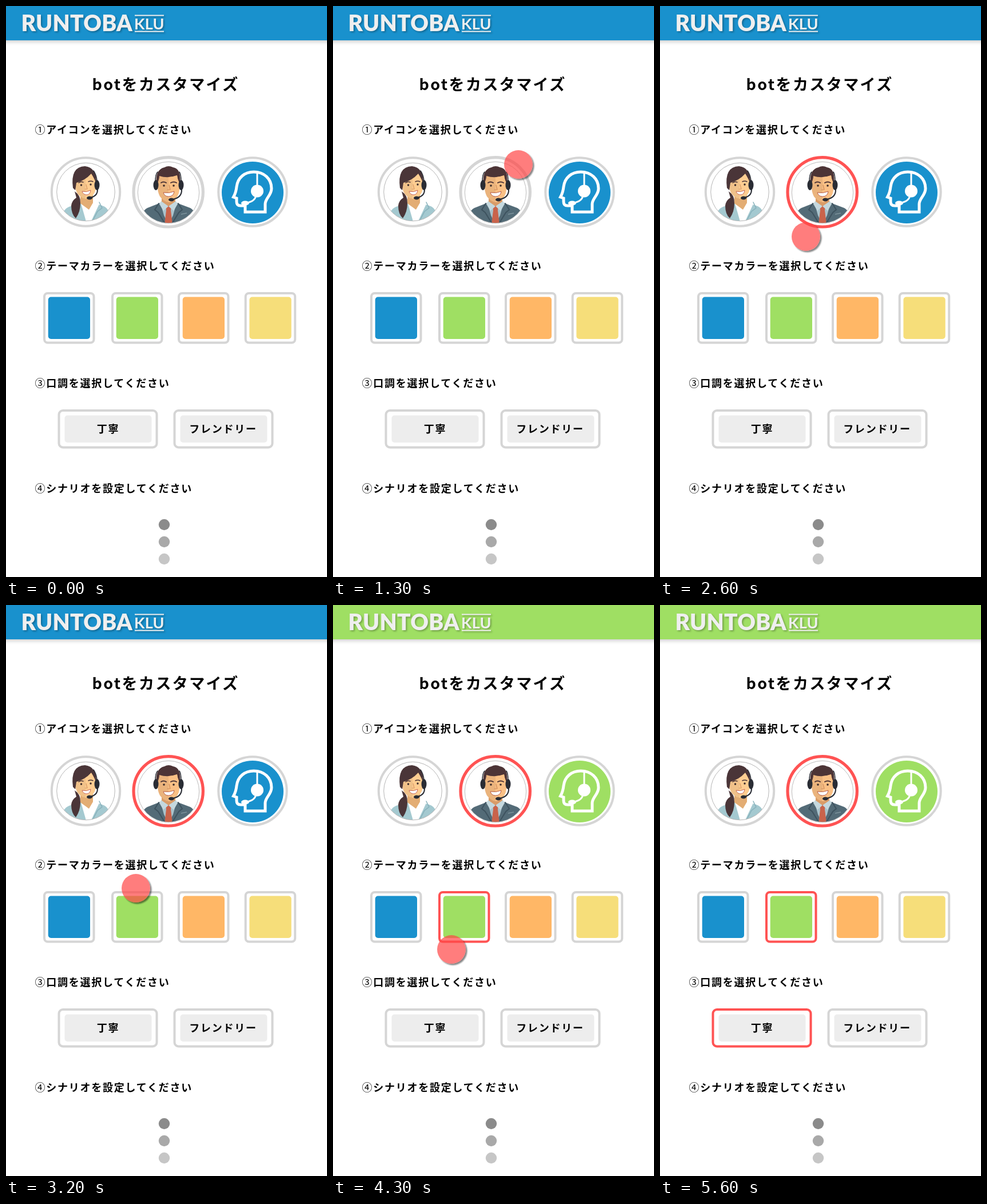
These frames come from a looping animation (561x998 px, 7600 ms). An HTML page:

```html
<!DOCTYPE html>
<html lang="ja">
<head>
<meta charset="utf-8">
<title>botをカスタマイズ</title>
<style>
  html, body { margin: 0; width: 100%; height: 100%; overflow: hidden; background: #fff; }
  svg { display: block; width: 100vw; height: 100vh; --theme: #1991cd; }
  text { font: 700 18px "Noto Sans CJK JP", "Noto Sans CJK", sans-serif; letter-spacing: 1.75px; fill: #000; }
  .thin { font-weight: 400; }
  .title { font-size: 27px; letter-spacing: 2.4px; }
  .brand text { font-family: Lato, sans-serif; font-weight: 900; fill: #efefef; letter-spacing: .2px; }
  .brand { filter: drop-shadow(2px 2px 1.5px rgba(0, 0, 0, .28)); }
  .bar { fill: var(--theme); filter: drop-shadow(0 3px 3px rgba(0, 0, 0, .18)); }
  .theme { fill: var(--theme); }
  .frame { fill: #fff; stroke: #d5d5d5; stroke-width: 4; }
  .frame.on { stroke: #ff5353; }
  .line { fill: none; stroke-linecap: round; stroke-linejoin: round; }
</style>
</head>
<body>
<svg id="stage" viewBox="0 0 561 998" preserveAspectRatio="none">
  <defs>
    <clipPath id="clipWoman"><circle cx="139.5" cy="325" r="50.5"/></clipPath>
    <clipPath id="clipMan"><circle cx="284" cy="326" r="53.5"/></clipPath>
    <clipPath id="rightHalfW"><rect x="139" y="280" width="40" height="80"/></clipPath>
    <clipPath id="rightHalfM"><rect x="284" y="280" width="40" height="80"/></clipPath>
    <filter id="soft" x="-30%" y="-30%" width="160%" height="160%"><feGaussianBlur stdDeviation="1.3"/></filter>
    <mask id="outside" maskUnits="userSpaceOnUse" x="-40" y="-40" width="80" height="80">
      <rect x="-40" y="-40" width="80" height="80" fill="#fff"/><circle r="25" fill="#000"/>
    </mask>
  </defs>

  <rect width="561" height="998" fill="#fff"/>
  <rect class="bar" x="-10" y="-10" width="581" height="70"/>
  <g class="brand">
    <text x="26.5" y="44" style="font-size:39px">RUNTOBA</text>
    <text x="224" y="40.5" style="font-size:27px;font-weight:700">KLU</text>
    <path d="M225 16.5H276M225 44.5H276" stroke="#efefef" stroke-width="2"/>
  </g>

  <text class="title" x="150.5" y="147">botをカスタマイズ</text>
  <g id="headings"></g>

  <!-- woman -->
  <circle class="frame" cx="139.5" cy="325" r="59.7"/>
  <g clip-path="url(#clipWoman)">
    <path d="M96 380Q97 356 110 351L131 344H153L171 350Q182 355 185 380Z" fill="#a4c9d0"/>
    <path d="M131 345L141 380H147L163 346L153 341Z" fill="#fff"/>
    <path d="M163 343L168 353L160 359L149 380" class="line" stroke="#86b0ba" stroke-width="1.5"/>
    <path d="M130 326H152V344L145 356L130 345Z" fill="#e3ad74"/>
    <path d="M120 324Q131 331 130 345Q130 360 122 371Q114 364 114 349Q115 340 123 335Z" fill="#4a3538"/>
    <path id="faceW" d="M120 306Q126 290 139 289Q152 290 157 304Q159 324 151 331Q144 337 139 337Q130 335 125 328Q120 320 120 306Z" fill="#f0c189"/>
    <use href="#faceW" clip-path="url(#rightHalfW)" style="filter:brightness(1.06)"/>
    <path d="M117 318Q112 281 138 280Q159 282 158 312Q156 304 149 293Q138 305 123 309Q122 316 121 322Z" fill="#4a3538"/>
    <path d="M127 309Q131 306 135 308M144 307Q148 305 152 307" class="line" stroke="#4a3538" stroke-width="1.5"/>
    <circle cx="131.5" cy="313" r="1.7" fill="#3b2b2b"/><circle cx="148" cy="312" r="1.7" fill="#3b2b2b"/>
    <path d="M140 312L142 320H138" class="line" stroke="#d99c68" stroke-width="1.2"/>
    <path d="M133 324Q141 326 148 322Q147 330 141 330Q135 330 133 324Z" fill="#fff" stroke="#c96657" stroke-width="1"/>
    <path d="M153 288Q158 295 159 306" class="line" stroke="#292c34" stroke-width="1.5"/>
    <ellipse cx="159" cy="313" rx="4.5" ry="9" fill="#292c34"/>
    <path d="M160 321Q160 332 148 335" class="line" stroke="#292c34" stroke-width="2"/>
    <ellipse cx="146" cy="335.5" rx="5" ry="3" fill="#292c34"/>
  </g>
  <circle cx="139.5" cy="325" r="50.8" fill="none" stroke="#b5b5b5"/>

  <!-- man -->
  <circle class="frame" id="pickMan" cx="283.7" cy="325.3" r="60.7" style="stroke-width:5.2px"/>
  <g clip-path="url(#clipMan)">
    <path d="M230 384Q237 357 247 353L270 344H298L322 353Q332 358 338 384Z" fill="#536b77"/>
    <path d="M270 344H298L292 366L284 382L276 366Z" fill="#a9c3cc"/>
    <path d="M272 330H296V344L284 351L272 344Z" fill="#d99c68"/>
    <path d="M279 349H289L288 357L291 382H277L280 357Z" fill="#c9634b"/>
    <path d="M271 341L284 350L275 358L268 346ZM297 341L284 350L293 358L300 346Z" fill="#c4d8de"/>
    <path d="M267 345L260 356L266 361L279 382M301 345L308 356L302 361L289 382" class="line" stroke="#3d525e" stroke-width="2"/>
    <path d="M306 364L316 362" stroke="#7d939c" stroke-width="1.5"/>
    <path d="M263 312Q260 286 277 282Q284 278 292 282Q307 284 304 312Z" fill="#4c3436"/>
    <path id="faceM" d="M265 309Q268 302 268 297Q283 302 299 296Q300 304 303 309Q304 326 299 333Q291 343 284 343Q276 342 269 333Q264 324 265 309Z" fill="#eab37c"/>
    <use href="#faceM" clip-path="url(#rightHalfM)" style="filter:brightness(1.07)"/>
    <path d="M271 309Q275 306 280 309M288 309Q293 306 298 309" class="line" stroke="#4c3436" stroke-width="2"/>
    <circle cx="276" cy="314" r="1.8" fill="#3b2b2b"/><circle cx="293" cy="314" r="1.8" fill="#3b2b2b"/>
    <path d="M285 313L287 321H282" class="line" stroke="#cf8e5d" stroke-width="1.2"/>
    <path d="M275 326Q285 328 294 324Q293 333 284 333Q277 333 275 326Z" fill="#fff" stroke="#b95e4a" stroke-width="1"/>
    <path d="M261 307Q261 294 265 290M306 307Q306 294 303 290" class="line" stroke="#292c34" stroke-width="1.5"/>
    <ellipse cx="262" cy="313" rx="4.5" ry="9" fill="#292c34"/>
    <ellipse cx="306" cy="313" rx="4.5" ry="9" fill="#292c34"/>
    <path d="M307 320Q308 335 291 338" class="line" stroke="#292c34" stroke-width="2"/>
    <ellipse cx="289" cy="338.5" rx="5" ry="3" fill="#292c34"/>
  </g>
  <circle cx="284" cy="326" r="53.7" fill="none" stroke="#bcbcbc"/>

  <!-- headset profile -->
  <circle class="frame" cx="431" cy="325" r="59.7"/>
  <circle class="theme" cx="431" cy="326" r="54"/>
  <g stroke="#fff" stroke-width="5" fill="none">
    <path d="M418 360V349H410Q403 349 403 342V336L397.5 334Q402 326 403 316C405 300 417 290 433 290C451 290 464 302 464 319C464 331 453 336 453 346V360Z"/>
    <path d="M439 291V318" stroke-width="3"/>
    <path d="M437 331Q435 342 420 344" stroke-width="3"/>
    <g fill="#fff" stroke="none"><circle cx="439" cy="323.5" r="11"/><ellipse cx="418" cy="344.5" rx="7" ry="4"/></g>
  </g>

  <g id="swatches"></g>
  <g id="buttons"></g>
  <g id="dots"></g>

  <g id="cursor">
    <g mask="url(#outside)"><circle cx="2.5" cy="2.5" r="25" opacity=".48" filter="url(#soft)"/></g>
    <circle r="25" fill="#ff4646" opacity=".7"/>
  </g>
  <g id="ripple" fill="none" stroke="#ff5050">
    <circle r="20" fill="#ff5050" fill-opacity=".33" stroke="none"/>
    <circle r="27.5" stroke-width="3.5" stroke-opacity=".5"/>
    <circle r="34" stroke-width="1.7" stroke-opacity=".5"/>
  </g>
</svg>

<script>
const $ = id => document.getElementById(id);
const BLUE = '#1991cd', GREEN = '#9fdf63';
const LOOP = 7600, STEP = 100;

const box = (x, y, w, h, r, attrs) =>
  `<rect x="${x}" y="${y}" width="${w}" height="${h}" rx="${r}" ${attrs}/>`;

const headings = [
  [222.7, '①', 'アイコンを選択してください'],
  [461.2, '②', 'テーマカラーを選択してください'],
  [666.2, '③', '口調を選択してください'],
  [850.2, '④', 'シナリオを設定してください'],
];
$('headings').innerHTML = headings.map(([y, mark, label]) =>
  `<text x="50.5" y="${y}"><tspan class="thin">${mark}</tspan>${label}</text>`).join('');

$('swatches').innerHTML = [[65, BLUE], [184, GREEN], [300, '#ffb766'], [416.7, '#f6de7a']].map(([x, color], i) =>
  box(x + 2, 502, 86.5, 86.5, 6, `class="frame" id="swatch${i}"`) +
  box(x + 8.7, 508.6, 73.3, 73.3, 5, `fill="${color}"`)).join('');

$('buttons').innerHTML = [[90.5, 158.7, '丁寧'], [292.5, 320.3, 'フレンドリー']].map(([x, textX, label], i) =>
  box(x + 2, 707, 171, 64.5, 7, `class="frame" id="button${i}"`) +
  box(x + 12, 715.5, 152, 47.5, 5, 'fill="#ededed"') +
  `<text x="${textX}" y="746">${label}</text>`).join('');

$('dots').innerHTML = ['#8b8b8b', '#a9a9a9', '#c6c6c6'].map((color, i) =>
  `<circle cx="276.5" cy="${906.5 + 30 * i}" r="9.7" fill="${color}"/>`).join('');

// Cursor path: [step, x, y], linear in between.
const path = [
  [3, 485, 192], [8, 400, 220], [10, 366, 238], [12, 337, 263], [14, 311, 291],
  [16, 290, 325], [17, 283, 344], [18, 285, 328], [20, 285, 328], [26, 255, 403],
  [30, 232, 463], [32, 227, 495], [34, 228, 525], [35, 229, 545], [38, 229, 545],
  [42, 217, 587], [43, 207, 602], [45, 182, 630], [46, 180, 646], [48, 207, 678],
  [50, 239, 707], [51, 232, 728], [52, 216, 748], [53, 200, 758], [54, 196, 742], [55, 196, 742],
];
const clicks = { man: 19, color: 36, tone: 55 };
const END = 56;

function cursorAt(step) {
  const i = Math.max(1, path.findIndex(([s]) => s >= step));
  const [s0, x0, y0] = path[i - 1], [s1, x1, y1] = path[i];
  const k = (step - s0) / (s1 - s0);
  return [x0 + (x1 - x0) * k, y0 + (y1 - y0) * k];
}

const show = (node, visible) => node.setAttribute('visibility', visible ? 'visible' : 'hidden');

function draw(step) {
  const moving = step >= path[0][0] && step < END;
  const rippling = Object.values(clicks).includes(step);
  show($('cursor'), moving && !rippling);
  show($('ripple'), rippling);
  if (moving) {
    const place = `translate(${cursorAt(step)})`;
    $('cursor').setAttribute('transform', place);
    $('ripple').setAttribute('transform', place);
  }
  $('pickMan').classList.toggle('on', step >= clicks.man);
  $('swatch1').classList.toggle('on', step >= clicks.color);
  $('button0').classList.toggle('on', step >= clicks.tone);
  $('stage').style.setProperty('--theme', step >= clicks.color ? GREEN : BLUE);
}

const start = performance.now();
let last = -1;
function tick() {
  const step = Math.floor((performance.now() - start) % LOOP / STEP);
  if (step !== last) draw(last = step);
  requestAnimationFrame(tick);
}
tick();
</script>
</body>
</html>
```
